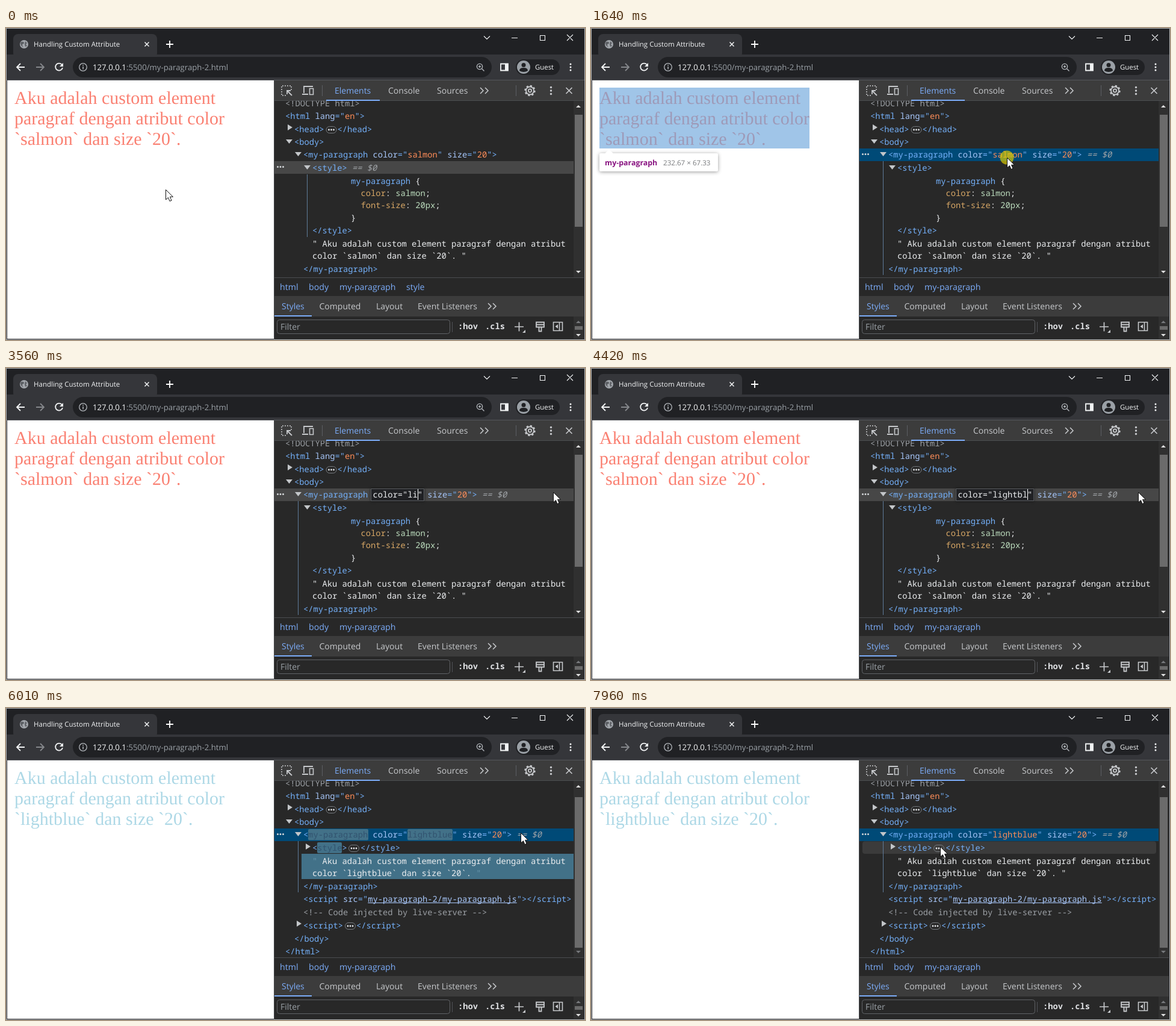
Animation of 962 by 518 pixels, one loop 8000 ms. Source, as an HTML page with a canvas:

```html
<!DOCTYPE html>
<html lang="en">
<head>
<meta charset="utf-8">
<title>Handling Custom Attribute</title>
<style>
html, body { margin: 0; width: 100%; height: 100%; overflow: hidden; background: #202124; }
canvas { display: block; }
</style>
</head>
<body>
<canvas id="stage" width="962" height="518"></canvas>
<script>
const ctx = document.getElementById('stage').getContext('2d');
const LOOP = 8000, CHAR = 8.25;
const CLICK = 1640, EDIT = 1770, COMMIT = 5890, FLASH = 1400;
const KEYS = [3090, 3560, 3660, 3900, 4030, 4290, 4420, 4620, 4680];
const MOVES = [ // start, end, from x, y, to x, y
  [500, 1240, 265, 268, 690, 215],
  [1310, 1311, 690, 215, 691, 215],
  [2240, 2430, 691, 215, 909, 206],
  [5380, 5860, 909, 206, 855, 207],
  [7390, 7960, 855, 207, 580, 230]
];
const UI = '"Open Sans", "Noto Sans", sans-serif';
const MONO = '"Noto Sans Mono", "DejaVu Sans Mono", monospace';
const PANEL = '#282828', BAR = '#3c3c3c', LINE = '#4b4d50', ICON = '#c7c9cc', ACCENT = '#7cacf8';
// t tag, a attribute, v value, w plain, g comment, i italic, p property, c css value, l link
const INK = { t: '#74b0f9', a: '#a8c7fa', v: '#fe8d59', w: '#eceef0', g: '#9b9fa4', i: '#a0a4a8',
  p: '#d6a665', c: '#bcdcbd', l: '#a8c7fa' };

const clamp = p => Math.min(1, Math.max(0, p));
const smooth = p => p * p * (3 - 2 * p);
const mix = (a, b, p) => `rgb(${a.map((v, i) => Math.round(v + (b[i] - v) * p))})`;

function box(x, y, w, h, color) {
  ctx.fillStyle = color;
  ctx.fillRect(x, y, w, h);
}
function round(x, y, w, h, r, fill, stroke) {
  ctx.beginPath();
  ctx.roundRect(x, y, w, h, r);
  if (fill) { ctx.fillStyle = fill; ctx.fill(); }
  if (stroke) { ctx.strokeStyle = stroke; ctx.lineWidth = 1; ctx.stroke(); }
}
function dot(x, y, r, color) {
  round(x - r, y - r, 2 * r, 2 * r, r, color);
}
function ring(x, y, r, color, width, dash = []) {
  ctx.beginPath();
  ctx.arc(x, y, r, 0, 7);
  ctx.setLineDash(dash);
  ctx.strokeStyle = color;
  ctx.lineWidth = width;
  ctx.stroke();
  ctx.setLineDash([]);
}
function line(d, color = ICON, width = 1.5) {
  ctx.strokeStyle = color;
  ctx.lineWidth = width;
  ctx.stroke(new Path2D(d));
}
function shape(d, color) {
  ctx.fillStyle = color;
  ctx.fill(new Path2D(d));
}
function text(s, x, y, color, font) {
  ctx.font = font;
  ctx.fillStyle = color;
  ctx.fillText(s, x, y);
}
const label = (s, x, y, color = ICON, size = 14) => text(s, x, y, color, `${size}px ${UI}`);
const cross = (x, y, r, color, width) =>
  line(`M${x - r} ${y - r}l${2 * r} ${2 * r}m0 ${-2 * r}l${-2 * r} ${2 * r}`, color, width);
const chevrons = (x, y) => line(`M${x} ${y - 5}l5 5l-5 5m8 -10l5 5l-5 5`);
const arrowDown = (x, y) => shape(`M${x} ${y}h11l-5.5 7z`, '#c3c6c9');
const arrowRight = (x, y) => shape(`M${x} ${y}v10l8 -5z`, '#c3c6c9');
const dots = (x, y, gap, r, color, vertical) => {
  for (let i = -1; i < 2; i++) dot(x + (vertical ? 0 : i * gap), y + (vertical ? i * gap : 0), r, color);
};

// One line of code; each part starts with its ink key. Returns the end position.
function code(x, mid, ...parts) {
  for (const part of parts) {
    const key = part[0], s = part.slice(1);
    text(s, x, mid + 5, INK[key], `${key === 'i' ? 'italic ' : ''}13.75px ${MONO}`);
    if (key === 'l') box(x, mid + 6, s.length * CHAR, 1, INK.l);
    x += s.length * CHAR;
  }
  return x;
}
function badge(x, y) {
  round(x + .5, y - 5.5, 17, 11, 5.5, null, '#777b80');
  dots(x + 9, y, 4, 1.4, '#e3e5e8');
}
function folded(x, mid, name) {
  arrowRight(x - 11, mid - 8);
  const end = code(x, mid, `t<${name}>`);
  badge(end + 3, mid + 1);
  code(end + 22, mid, `t</${name}>`);
}

function browser() {
  box(0, 0, 962, 518, '#202124');
  round(12, 10, 239, 40, 8, '#35363a');
  box(1, 44, 960, 43, '#35363a');
  box(1, 86, 960, 1, '#55575b');
  dot(30, 27, 7, '#a3a7ac');
  shape('M25 23q4 -1 5 1q0 3 -3 3q0 3 2 5q-5 -2 -5 -7zM32 22l3 3l-2 2l2 3l-3 1l-1 -4z', '#5c5f64');
  label('Handling Custom Attribute', 46, 31, '#f1f3f4', 11.5);
  cross(234, 27, 3.5, '#f1f3f4', 1.5);
  line('M266 27h12m-6 -6v12', '#fff', 1.8);
  line('M794 13.500l5 5l5 -5M840 16.500h10M887.500 12.500h8v8h-8zM932 11l10 10m0 -10l-10 10', '#f1f3f4', 1.1);

  line('M31 65h-13m6 -6l-6 6l6 6', '#f1f3f4', 1.8);
  line('M50 65h13m-6 -6l6 6l-6 6', '#85878b', 1.8);
  line('M93 61a6 6 0 1 0 1 5', '#f1f3f4', 1.8);
  shape('M95 58v6h-6z', '#f1f3f4');
  round(111, 48, 696, 34, 17, '#202124');
  ring(128, 65, 6.3, '#b4b8bd', 1.3);
  box(127.3, 64, 1.5, 4.5, '#b4b8bd');
  box(127.3, 61, 1.5, 1.6, '#b4b8bd');
  label('127.0.0.1', 144, 70, '#f1f3f4', 13.2);
  label(':5500/my-paragraph-2.html', 200, 70, '#9aa0a6', 13.2);
  ring(787, 64, 4.6, '#b4b8bd', 1.4);
  line('M790.500 67.500l4 4M785 64h4m-2 -2v4', '#b4b8bd', 1.4);
  line('M822 59.500h12v11h-12z', '#f1f3f4', 1.8);
  box(829, 59, 5, 12, '#f1f3f4');
  round(847, 52, 73, 26, 13, '#202124');
  dot(860, 65, 11, '#9aa0a6');
  dot(860, 61.5, 3.5, '#202124');
  shape('M853 71q0 -5 7 -5t7 5q-7 4 -14 0z', '#202124');
  label('Guest', 879, 69, '#f1f3f4', 11.4);
  dots(938, 65, 5, 1.5, '#f1f3f4', true);
}

function toolbar() {
  box(445, 87, 515, 430, PANEL);
  box(446, 87, 514, 33, BAR);
  box(446, 120, 514, 1, LINE);
  ctx.setLineDash([2, 2]);
  line('M465 112h-7v-16h16v7', ICON, 1.5);
  ctx.setLineDash([]);
  line('M475 112l-8 -8m0 6v-6h6', ICON, 1.8);
  line('M495 108v-11h15M492 110h10', ICON, 1.8);
  line('M504.500 100.500h6v10h-6z', ICON, 1.6);
  box(525, 95, 1, 18, '#5c5f63');
  label('Elements', 546, 109, ACCENT);
  box(532, 119, 89, 2, ACCENT);
  label('Console', 635, 109);
  label('Sources', 716, 109);
  chevrons(788, 104);
  box(847, 95, 1, 18, '#5c5f63');
  ring(870.5, 104, 6.5, ICON, 1.8);
  ring(870.5, 104, 8, ICON, 2.4, [Math.PI, Math.PI]);
  ring(870.5, 104, 2.6, ICON, 1.7);
  dots(905.5, 104, 5.5, 1.7, ICON, true);
  cross(935.5, 104, 5, ICON, 1.7);
}

function footer(styleSelected) {
  box(446, 414, 514, 31, PANEL);
  box(446, 414, 514, 1, LINE);
  const crumbs = [['html', 455], ['body', 503], ['my-paragraph', 554]];
  if (styleSelected) crumbs.push(['style', 665]);
  crumbs.forEach(([s, x]) => label(s, x, 435, ACCENT, 14.2));
  box(446, 445, 514, 34, BAR);
  label('Styles', 458, 467, ACCENT);
  box(446, 477, 62, 2, ACCENT);
  label('Computed', 520.5, 467);
  label('Layout', 615, 467);
  label('Event Listeners', 684, 467);
  chevrons(801, 462);
  box(446, 479, 514, 37, PANEL);
  round(450.5, 484.5, 287, 23, 4, PANEL, '#606367');
  label('Filter', 456, 501, '#9aa0a6');
  box(741, 488, 1, 17, '#505357');
  text(':hov', 751, 500, '#dfe1e4', `bold 13.75px ${MONO}`);
  text('.cls', 796, 500, '#dfe1e4', `bold 13.75px ${MONO}`);
  line('M845 496h15m-7.500 -7.500v15', ICON, 1.7);
  shape('M863 501v5h-5z', ICON);
  line('M881 488.500h13v8h-13zM881 492.500h13M885.500 497v6.500h4v-6.500', ICON, 1.8);
  line('M909.500 488.500h15v14h-15zM919.500 488v15', ICON, 1.6);
  shape('M917 492v7l-4.500 -3.500z', ICON);
  box(943, 479, 17, 37, '#303030');
  box(945, 495, 13, 6, '#6b6b6b');
  shape('M947 490h8l-4 -4z', '#77797c');
  shape('M947 508h8l-4 4z', '#e0e0e0');
}

function scrollbar(top, height, atEnd) {
  box(943, 121, 17, 293, '#303030');
  box(945, top, 13, height, '#6b6b6b');
  shape('M947 132h8l-4 -4z', '#e0e0e0');
  shape('M947 403h8l-4 4z', atEnd ? '#77797c' : '#e0e0e0');
}

function page(color, name) {
  box(2, 87, 443, 429, '#fff');
  ['Aku adalah custom element', 'paragraf dengan atribut color', `\`${name}\` dan size \`20\`.`]
    .forEach((s, i) => text(s, 14, 126 + 34 * i, color, '30px "Liberation Serif", serif'));
}

function inspectOverlay() {
  box(14, 99, 349, 101, 'rgba(111,168,220,.66)');
  ctx.save();
  ctx.shadowColor = 'rgba(0,0,0,.4)';
  ctx.shadowBlur = 6;
  ctx.shadowOffsetY = 1;
  round(14, 208, 197, 30, 2, '#fff');
  ctx.restore();
  shape('M23 208.500l7 -7l7 7z', '#fff');
  text('my-paragraph', 23, 228, '#881280', `bold 12.4px ${UI}`);
  label('232.67 × 67.33', 120, 228, '#77797c', 11.6);
}

function selectRow(y, color) {
  box(446, y, 497, 21, color);
  dots(456, y + 9.5, 4.5, 1.5, '#d5d8db');
}

function editor(typed) {
  const name = 'lightblue'.slice(0, typed) || 'salmon';
  const start = 667.25, end = start + name.length * CHAR;
  ctx.save();
  ctx.shadowColor = 'rgba(0,0,0,.6)';
  ctx.shadowBlur = 4;
  box(606, 200, end + CHAR + 3 - 606, 21, '#202124');
  ctx.restore();
  round(606.5, 200.5, end + CHAR + 2 - 606, 20, 0, null, '#5c5f63');
  if (!typed) box(start, 201, 6 * CHAR, 19, '#004a77');
  code(609.5, 210, 'wcolor="' + name + '"');
  return end + CHAR;
}

function treeHead() {
  code(464, 125, 'g<!DOCTYPE html>');
  code(464, 146, 't<html ', 'alang', 't="', 'ven', 't">');
  folded(479, 168, 'head');
  arrowDown(465, 185);
  code(479, 189, 't<body>');
  arrowDown(480, 206);
}

function treeBefore(t, hover) {
  const styleSelected = t < CLICK, editing = t >= EDIT;
  if (styleSelected) selectRow(221, '#474747');
  else selectRow(200, editing ? '#474747' : '#004a77');
  if (hover && styleSelected) round(451, 200, 488, 21, 4, '#3b3b3b');
  box(styleSelected ? 500 : 485, styleSelected ? 243 : 221, 1, styleSelected ? 104 : 189, '#5f7c9a');
  treeHead();
  let x = code(494, 210, 't<my-paragraph ');
  if (editing) {
    const typed = KEYS.filter(k => t >= k).length;
    x = editor(typed);
    if (typed && t < 5210) box(Math.round(x - CHAR), 201, 1, 18, '#fff');
  } else {
    x = code(x, 210, 'acolor', 't="', 'vsalmon', 't"');
  }
  x = code(x, 210, 'a size', 't="', 'v20', 't">');
  if (!styleSelected) code(x, 210, 'i == $0');
  arrowDown(495, 228);
  x = code(509, 232, 't<style>');
  if (styleSelected) code(x, 232, 'i == $0');
  code(573, 254, 'tmy-paragraph', 'w {');
  code(589.5, 274, 'pcolor', 'w: ', 'csalmon', 'w;');
  code(589.5, 294, 'pfont-size', 'w: ', 'c20px', 'w;');
  code(573, 315, 'w}');
  code(509, 336, 't</style>');
  code(509, 358, 'w" Aku adalah custom element paragraf dengan atribut');
  code(509, 378, 'wcolor `salmon` dan size `20`. "');
  code(494, 400, 't</my-paragraph>');
}

function treeAfter(t, hover) {
  const p = (t - COMMIT) / FLASH;
  const fade = smooth(clamp(p / .8) ** .6), alpha = clamp((1 - p) / .2);
  const glow = mix([74, 129, 156], [30, 33, 38], fade);
  const flashBox = (x, y, w, h, r = 2) => {
    ctx.globalAlpha = alpha;
    round(x, y, w, h, r, glow);
    ctx.globalAlpha = 1;
  };
  const flashText = (s, x, mid, from, to) =>
    text(s, x, mid + 5, mix(from, to, fade), `13.75px ${MONO}`);
  const dim = [36, 64, 82], tag = [116, 176, 249], teal = [74, 129, 156], plain = [236, 238, 240];

  selectRow(200, '#004a77');
  if (hover) round(451, 221.5, 488, 20.5, 4, '#3b3b3b');
  box(485, 221, 1, 85, '#5f7c9a');
  flashBox(502, 201, 100, 18.5);
  flashBox(667, 201, 75, 18.5);
  flashBox(517, 223, 41, 18);
  flashBox(491, 242, 452, 42, 0);
  treeHead();
  code(494, 210, 't<');
  flashText('my-paragraph', 502.25, 210, dim, tag);
  code(601.25, 210, 'a color', 't="');
  if (p < 1) flashText('lightblue', 667.25, 210, dim, tag);
  else code(667.25, 210, 'vlightblue');
  code(741.5, 210, 't"', 'a size', 't="', 'v20', 't">', 'i == $0');
  arrowRight(498, 225);
  code(509, 232, 't<');
  flashText('style', 517.25, 232, dim, tag);
  code(558.5, 232, 't>');
  badge(569, 233);
  code(589, 232, 't</style>');
  flashText('"', 509, 254, teal, plain);
  code(525.5, 254, 'wAku adalah custom element paragraf dengan atribut');
  const end = code(509, 274, 'wcolor `lightblue` dan size `20`. ');
  flashText('"', end, 274, teal, plain);
  code(494, 296, 't</my-paragraph>');
  code(494, 317, 't<script ', 'asrc', 't="', 'lmy-paragraph-2/my-paragraph.js', 't"></' + 'script>');
  code(494, 339, 'g<!-- Code injected by live-server -->');
  folded(494, 361, 'script');
  code(479, 383, 't</body>');
  code(464, 404, 't</html>');
}

function pointerAt(t) {
  let [, , x, y] = MOVES[0];
  for (const [start, end, x0, y0, x1, y1] of MOVES) {
    if (t < start) break;
    const p = smooth(clamp((t - start) / (end - start)));
    x = x0 + (x1 - x0) * p;
    y = y0 + (y1 - y0) * p;
  }
  return [x, y];
}
function pointer(x, y) {
  ctx.save();
  ctx.translate(Math.round(x) + .5, Math.round(y) + .5);
  const d = 'M0 0v16.500l4 -3.500l2.500 6l3 -1.200l-2.500 -6h5z';
  shape(d, '#fff');
  line(d, '#111', 1);
  ctx.restore();
}

function draw(t) {
  const [x, y] = pointerAt(t), done = t >= COMMIT, inTree = x > 446;
  const overParagraph = inTree && y < 221 && t < EDIT;
  ctx.textRendering = 'geometricPrecision';
  browser();
  page(done ? '#add8e6' : '#fa8072', done ? 'lightblue' : 'salmon');
  if (overParagraph) inspectOverlay();
  toolbar();
  ctx.save();
  ctx.beginPath();
  ctx.rect(446, 121, 514, 293);
  ctx.clip();
  if (done) treeAfter(t, y >= 221);
  else treeBefore(t, overParagraph);
  if (done) scrollbar(148, 250, true);
  else scrollbar(144, 186, false);
  ctx.restore();
  footer(t < CLICK);
  box(445, 87, 1, 430, LINE);
  round(.5, .5, 961, 517, 0, null, '#b4b6b8');
  if (t >= CLICK && t < 1890) dot(691, 215, 11.5, 'rgba(222,205,0,.68)');
  pointer(x, y);
}

function tick() {
  draw(performance.now() % LOOP);
  requestAnimationFrame(tick);
}
tick();
</script>
</body>
</html>
```
